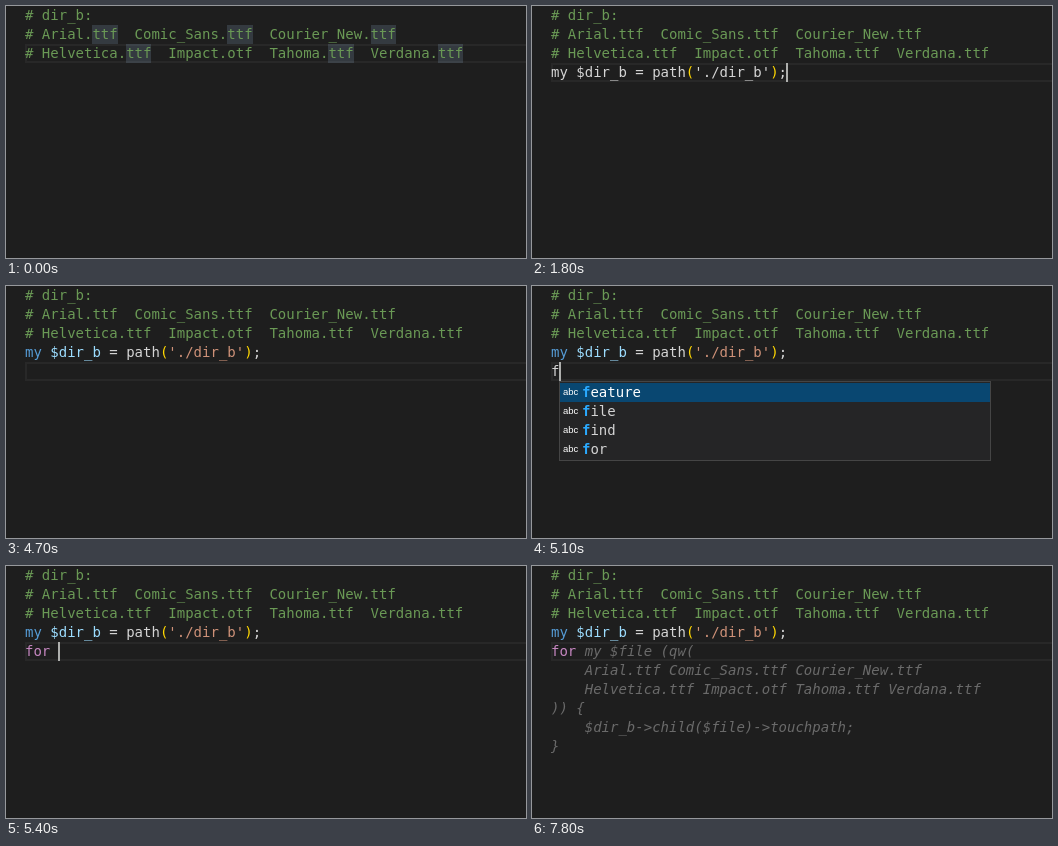
An HTML page that plays this animation: 520x252 px, repeating every 8000 ms.

```html
<!DOCTYPE html>
<html>
<head>
<meta charset="utf-8">
<style>
html, body { margin: 0; width: 100%; height: 100%; overflow: hidden; background: #1e1e1e; }
#stage { position: relative; width: 520px; height: 252px; overflow: hidden;
  font: 14px/19px "DejaVu Sans Mono", monospace; color: #d4d4d4; white-space: pre; }
#stage div { position: absolute; }
#text { left: 19px; top: 0; }
.line { left: 19px; width: 520px; height: 19px; box-sizing: border-box; border: 2px solid #282828; }
.mark { height: 19px; background: rgba(173, 214, 255, .15); }
.caret { width: 2px; height: 19px; background: #aeafad; }
.comment { color: #6a9955; }
.key { color: #569cd6; }
.var { color: #9cdcfe; }
.str { color: #ce9178; }
.paren { color: #ffd700; }
.flow { color: #c586c0; }
.ghost { color: #6a6a6a; font-style: italic; }
.popup { top: 95px; width: 430px; padding: 1px 0; border: 1px solid #454545; background: #252526; }
#stage .item { position: relative; height: 19px; padding-left: 22px; }
.item:first-child { background: #094771; color: #fff; }
.item b { color: #2aaaff; }
.item i { position: absolute; left: 3px; font: 9.5px/18px "Liberation Sans", sans-serif; color: #fff; }
</style>
</head>
<body>
<div id="stage"></div>
<script>
const stage = document.getElementById('stage');
const CHAR = 8.428, LEFT = 19, ROW = 19, LOOP = 8000;
const x = col => LEFT + col * CHAR;
const span = (cls, s) => `<span class="${cls}">${s}</span>`;

const comments = [
  '# dir_b:',
  '# Arial.ttf  Comic_Sans.ttf  Courier_New.ttf',
  '# Helvetica.ttf  Impact.otf  Tahoma.ttf  Verdana.ttf'
];
const assign = "my $dir_b = path('./dir_b');";
const open = span('paren', '('), close = span('paren', ')');
const plain = `my $dir_b = path${open}'./dir_b'${close};`;
const colored = `${span('key', 'my')} ${span('var', '$dir_b')} = path${open}${span('str', "'./dir_b'")}${close};`;
const loopStart = span('flow', 'for') + ' ';
const loopGhost = `my $file (qw(
    Arial.ttf Comic_Sans.ttf Courier_New.ttf
    Helvetica.ttf Impact.otf Tahoma.ttf Verdana.ttf
)) {
    $dir_b->child($file)->touchpath;
}`;

// Each step: start time, current row, caret column, text below the comments, completion words
const steps = [
  [0, 2, 52, ''],
  [500, 3, 0, ''],
  [1200, 3, 0, span('ghost', assign)],
  [1800, 3, 28, plain],
  [1900, 3, 28, colored],
  [2200, 4, 0, colored],
  [5100, 4, 1, colored + '\nf', ['feature', 'file', 'find', 'for']],
  [5200, 4, 2, colored + '\nfo', ['for']],
  [5300, 4, 3, colored + '\n' + span('flow', 'for'), ['for']],
  [5400, 4, 4, colored + '\n' + loopStart],
  [6800, 4, 4, colored + '\n' + loopStart + span('ghost', loopGhost)]
];
// Times at which the caret turns on or off, starting hidden
const blinks = [500, 1000, 1400, 2800, 3200, 3700, 4200, 4700, 5100, 6000, 6500, 6900, 7300, 7800];

const marks = () => comments.map((s, row) => [...s.matchAll(/ttf/g)].map(m =>
  `<div class="mark" style="left:${x(m.index)}px;top:${row * ROW}px;width:${3 * CHAR}px"></div>`
).join('')).join('');

const popup = (words, col) => `<div class="popup" style="left:${Math.floor(x(col))}px">` +
  words.map(w => `<div class="item"><i>abc</i><b>${w.slice(0, col)}</b>${w.slice(col)}</div>`).join('') +
  '</div>';

let shown;
function draw(now) {
  const t = now % LOOP;
  const index = steps.findLastIndex(s => s[0] <= t);
  const caretOn = blinks.filter(b => b <= t).length % 2;
  const key = index + ':' + caretOn;
  if (key !== shown) {
    shown = key;
    const [, row, col, code, words] = steps[index];
    const top = row * ROW;
    stage.innerHTML = `<div class="line" style="top:${top}px"></div>` +
      (index ? '' : marks()) +
      `<div id="text">${span('comment', comments.join('\n'))}\n${code}</div>` +
      (caretOn ? `<div class="caret" style="left:${Math.floor(x(col))}px;top:${top}px"></div>` : '') +
      (words ? popup(words, col) : '');
  }
  requestAnimationFrame(draw);
}
draw(performance.now());
</script>
</body>
</html>
```
